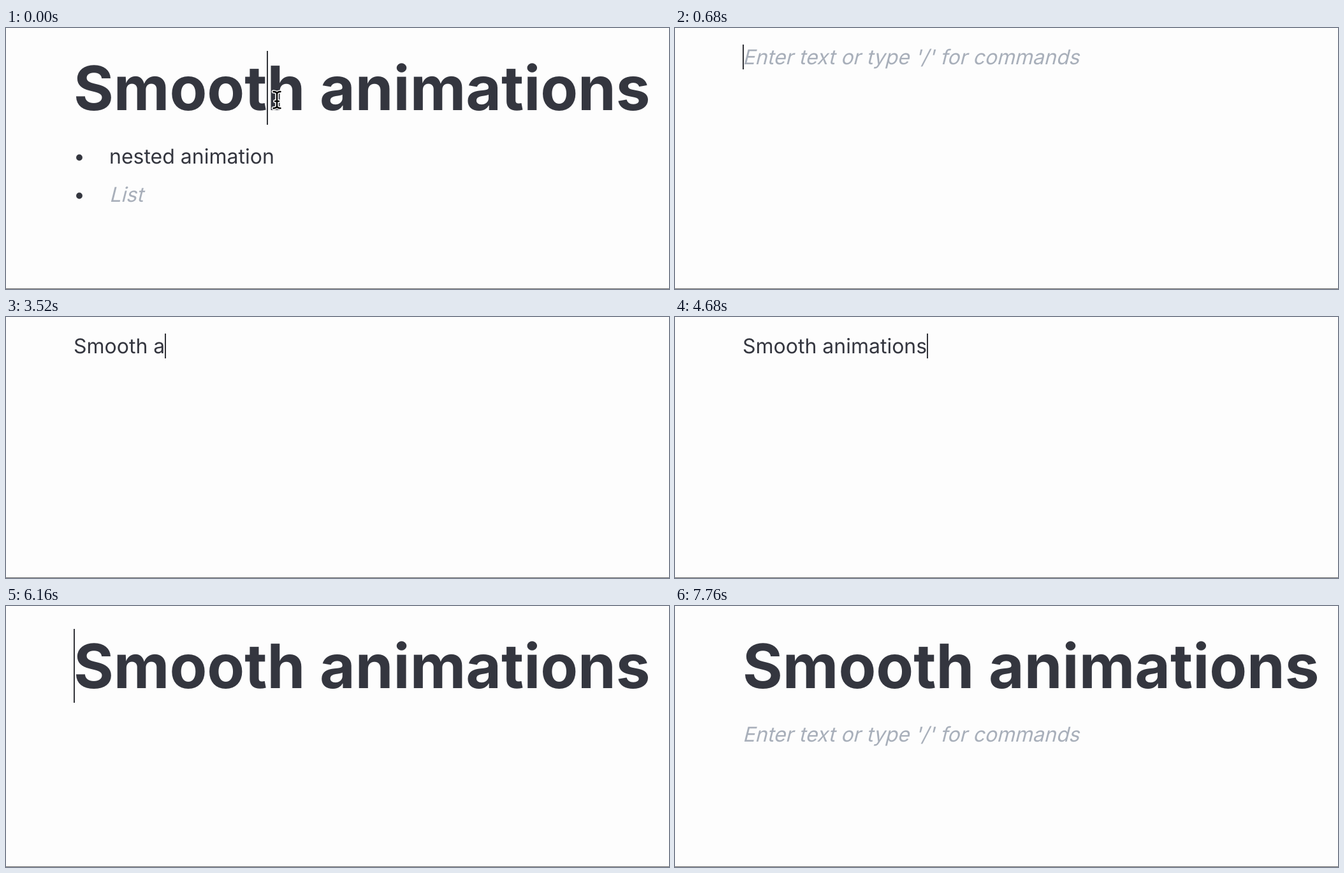
An HTML page that plays this animation: 1040x410 px, repeating every 8000 ms.

```html
<!DOCTYPE html>
<html lang="en">
<head>
<meta charset="utf-8">
<title>Editor typing</title>
<style>
  html, body { margin: 0; width: 100%; height: 100%; overflow: hidden; background: #fdfdfd; }
  svg { display: block; width: 1040px; height: 410px; }
  text {
    font-family: Inter, sans-serif; font-size: 32px; fill: #34363f; white-space: pre;
    font-optical-sizing: none; font-variation-settings: "opsz" 14;
    text-rendering: geometricPrecision;
  }
  .hint { fill: #a8afba; }
</style>
</head>
<body>
<svg viewBox="0 0 1040 410">
  <rect width="1040" height="410" fill="#fdfdfd"/>

  <g id="selection" fill="#a9cfff">
    <rect x="106" y="22" width="932" height="144"/>
    <rect x="162" y="178" width="270" height="48"/>
    <rect x="162" y="238" width="9" height="48"/>
  </g>

  <g id="list">
    <circle cx="115" cy="203.5" r="4.9" fill="#34363f"/>
    <circle cx="115" cy="263.5" r="4.9" fill="#34363f"/>
    <text x="162" y="213">nested animation</text>
    <text class="hint" transform="translate(162 273) skewX(-14)">List</text>
  </g>

  <g id="handles">
    <path d="M14 94H46M30 78V110" stroke="#c8c8c8" stroke-width="2.7"/>
    <path d="M69 83h0M79.5 83h0M69 94h0M79.5 94h0M69 105h0M79.5 105h0"
      stroke="#c8c8c8" stroke-width="8" stroke-linecap="round"/>
  </g>

  <text id="line" x="106"></text>
  <text id="hint" class="hint">Enter text or type '/' for commands</text>
  <rect id="caret" width="2" fill="#333439"/>

  <g id="toolbar">
    <rect x="-20" y="361" width="442.5" height="90" rx="8" fill="#000" opacity=".05"/>
    <rect x="-20" y="362" width="441" height="90" rx="7" fill="#fff" stroke="#d3d4d8" stroke-width="2"/>
    <rect x="-10" y="363" width="37" height="60" fill="#f2f3f5"/>
    <g id="icons"></g>
  </g>

  <g id="mouse" fill="none" stroke-linecap="round" stroke-linejoin="round">
    <path id="beam" stroke="#fff" stroke-width="5.6"
      d="M-5.5 -13Q0 -13 0 -9Q0 -13 5.5 -13M0 -9V9M-5.5 13Q0 13 0 9Q0 13 5.5 13M-3 2H3"/>
    <use href="#beam" id="beamCore"/>
  </g>

  <rect y="409" width="1040" height="1" fill="#6c6c6c"/>
</svg>

<script>
const LOOP = 8000, STEP = 40, BLINK = 520, LEFT = 106;
const TITLE = 'Smooth animations';

const SELECT = 80, TOOLBAR = 120, CLEAR = 640, HOME = 5000, HASH = 5440,
  GROW = 5960, GROWN = 6160, END = 6800, ENTER = 7240;
const keys = [1760, 2000, 2280, 2440, 2920, 3080, 3200, 3520, 3640, 3840,
  4000, 4120, 4240, 4360, 4440, 4560, 4680];
const inputs = [0, CLEAR, ...keys, HOME, HASH, GROW, END, ENTER];

const $ = id => document.getElementById(id);
const line = $('line'), hint = $('hint'), caret = $('caret');

function set(el, attrs) {
  for (const name in attrs) el.setAttribute(name, attrs[name]);
}
function show(el, on) {
  el.style.display = on ? '' : 'none';
}

// Toolbar icons on a 24-unit grid
const NAVY = '#172b4d', GRAY = '#777';
const bars = 'M3 4h18v2H3V4zm0 15h18v2H3v-2zm8-5h10v2H11v-2zm0-5h10v2H11V9z';
const icons = [
  [NAVY, 'M8 11h4.5a2.5 2.5 0 1 0 0-5H8v5zm10 4.5a4.5 4.5 0 0 1-4.5 4.5H6V4h6.5a4.5 4.5 0 0 1 3.256 7.606A4.498 4.498 0 0 1 18 15.5zM8 13v5h5.5a2.5 2.5 0 1 0 0-5H8z'],
  [NAVY, 'M15 20H7v-2h2.927l2.116-12H9V4h8v2h-2.927l-2.116 12H15z'],
  [NAVY, 'M8 3v9a4 4 0 1 0 8 0V3h2v9a6 6 0 1 1-12 0V3h2zM4 20h16v2H4v-2z'],
  [NAVY, 'M3 12h18v2H3zM16.4 5v2.1Q14.6 6.1 12.5 6.1Q8.8 6.1 8.8 8.45Q8.8 10.1 13.1 11H7.6Q6.5 10 6.5 8.45Q6.5 4 12.2 4Q14.4 4 16.4 5zM17.15 14Q17.5 14.8 17.5 15.7Q17.5 20 11.6 20Q9.1 20 6.7 18.86V16.6Q9 17.9 11.4 17.9Q15.2 17.9 15.2 15.7Q15.2 14.8 14.5 14z'],
  [GRAY, bars + 'M7 12.5L3 16V9z'],
  [GRAY, bars + 'M3 12.5L7 9v7z'],
  [NAVY, 'M18.364 15.536L16.95 14.12l1.414-1.414a5 5 0 1 0-7.071-7.071L9.879 7.05 8.464 5.636 9.88 4.222a7 7 0 0 1 9.9 9.9l-1.415 1.414zm-2.828 2.828l-1.415 1.414a7 7 0 0 1-9.9-9.9l1.415-1.414L7.05 9.88l-1.414 1.414a5 5 0 1 0 7.071 7.071l1.414-1.414 1.415 1.414zm-.708-10.607l1.415 1.415-7.071 7.07-1.415-1.414 7.071-7.07z']
];
icons.forEach(([fill, d], i) => {
  const path = document.createElementNS('http://www.w3.org/2000/svg', 'path');
  set(path, { d, fill, transform: `translate(${37 + 56 * i} 375) scale(1.6)` });
  $('icons').append(path);
});

// The core of the pointer reuses the halo path with a thinner dark stroke
const core = $('beam').cloneNode();
core.removeAttribute('id');
set(core, { stroke: '#000', 'stroke-width': 2.4 });
$('beamCore').replaceWith(core);

// CSS "ease": cubic-bezier(.25, .1, .25, 1)
function ease(x) {
  if (x <= 0 || x >= 1) return Math.min(1, Math.max(0, x));
  const curve = (u, a, b) => 3 * u * (1 - u) ** 2 * a + 3 * u * u * (1 - u) * b + u ** 3;
  let lo = 0, hi = 1;
  for (let i = 0; i < 20; i++) {
    const mid = (lo + hi) / 2;
    if (curve(mid, .25, .25) < x) lo = mid; else hi = mid;
  }
  return curve(lo, .1, 1);
}

function content(t) {
  if (t < CLEAR || t >= GROW) return TITLE;
  if (t >= HASH) return '#' + TITLE;
  return TITLE.slice(0, keys.filter(k => k <= t).length);
}

function caretIndex(t, text) {
  if (t < CLEAR) return 5;
  if (t >= HOME && t < HASH) return 0;
  if (t >= HASH && t < GROW) return 1;
  if (t >= GROW && t < END) return 0;
  return text.length;
}

function draw(t) {
  const heading = t < CLEAR || t >= GROW;
  const size = t < CLEAR ? 96 : 32 + 64 * ease((t - GROW) / (GROWN - GROW));
  const top = Math.round(21.6 + 0.145 * size);
  const text = content(t);

  line.textContent = text;
  line.style.fontSize = size + 'px';
  line.style.fontWeight = heading ? 700 : 400;
  set(line, { y: top + 0.96875 * size });

  const newLine = t >= ENTER;
  show(hint, newLine || (t >= CLEAR && t < keys[0]));
  set(hint, { transform: `translate(${LEFT} ${newLine ? 213 : 57}) skewX(-14)` });

  const index = newLine ? 0 : caretIndex(t, text);
  const offset = index ? line.getSubStringLength(0, index) : 0;
  set(caret, {
    x: Math.floor(LEFT + offset),
    y: newLine ? 182 : top,
    height: newLine ? 39 : Math.round(1.21 * size)
  });
  const last = Math.max(...inputs.filter(k => k <= t));
  const selected = t >= SELECT && t < CLEAR;
  show(caret, !selected && (t - last) % (2 * BLINK) < BLINK);

  show($('list'), t < CLEAR);
  show($('selection'), selected);
  show($('handles'), t >= STEP && t < CLEAR);
  show($('toolbar'), t >= TOOLBAR && t < CLEAR + STEP);
  show($('mouse'), t < CLEAR);
  const move = Math.min(1, t / TOOLBAR);
  set($('mouse'), { transform: `translate(${425 + 18 * move} ${113 + 3.5 * move})` });
}

function tick() {
  draw(Math.floor(performance.now() % LOOP / STEP) * STEP);
  requestAnimationFrame(tick);
}
tick();
</script>
</body>
</html>
```
